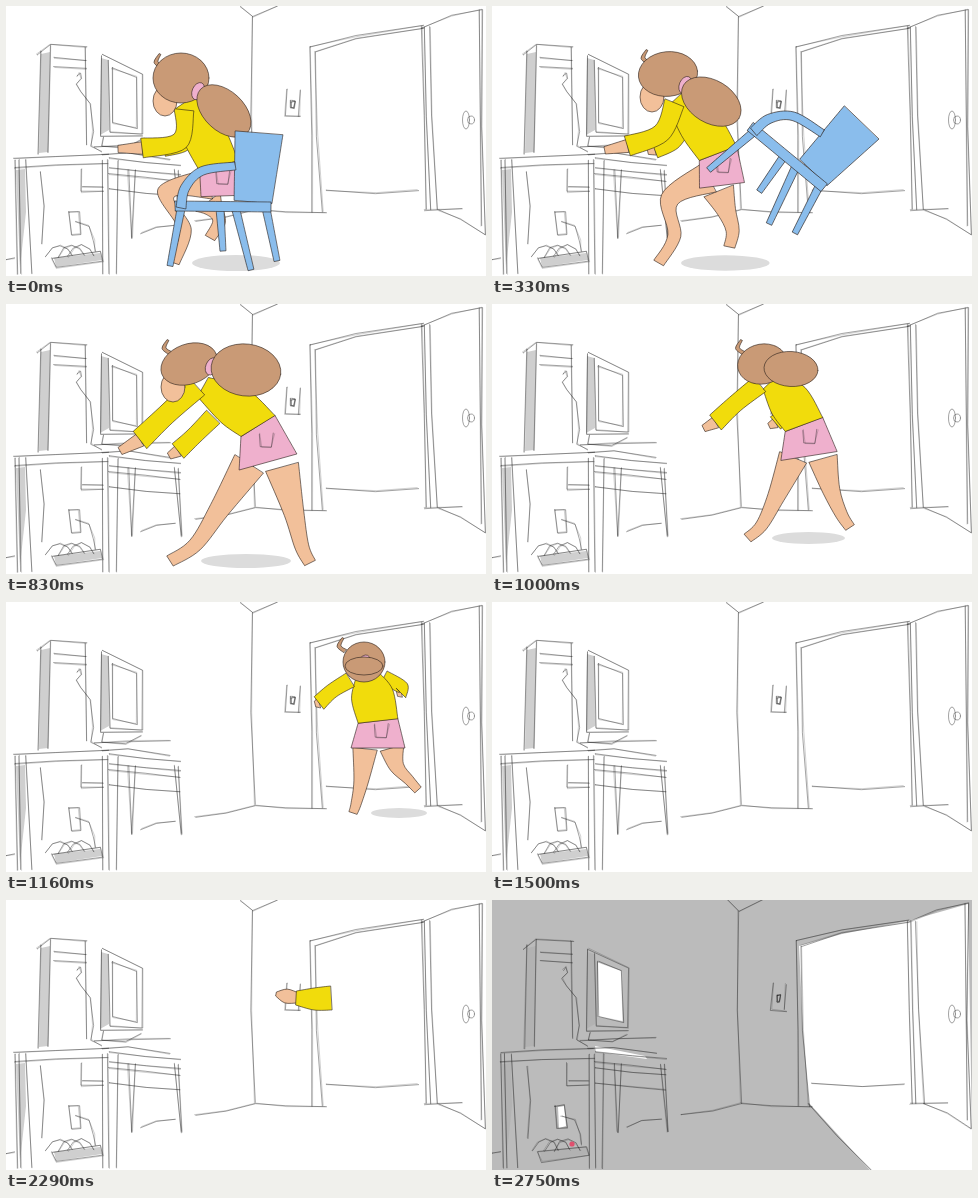
Write an HTML page with a canvas that moves like this. It is 480 by 270 pixels and loops after 3.25 s.

```html
<!DOCTYPE html>
<html lang="en">
<head>
<meta charset="utf-8">
<style>
html, body { margin: 0; width: 100%; height: 100%; overflow: hidden; background: #fff; }
canvas { display: block; }
</style>
</head>
<body>
<canvas id="stage" width="480" height="270"></canvas>
<script>
const ctx = document.getElementById('stage').getContext('2d');
const LOOP = 3250, TICK = LOOP / 78;
const SKIN = '#f2c09a', HAIR = '#c99a76', YELLOW = '#f1dc0c', PINK = '#efb0cd', BLUE = '#8abdec';

const clamp = (v, a, b) => Math.min(b, Math.max(a, v));
const mix = (a, b, u) => Array.isArray(a) ? a.map((v, i) => mix(v, b[i], u)) : a + (b - a) * u;
const blend = (a, b, u) => Object.fromEntries(Object.keys(a).map(k => [k, mix(a[k], b[k], u)]));

// Joints of the girl; ellipses are x, y, rx, ry, turn.
const sitting = {
  head: [175, 72, 28, 25, 0], tail: [218, 105, 32, 20, .75], facing: 1, girth: .9, hem: 19,
  spine: [[178, 97], [196, 125], [213, 160], [214, 190]],
  nearLeg: [[203, 178], [160, 187], [179, 224], [168, 257]],
  farLeg: [[202, 196], [208, 204], [213, 216], [204, 232]],
  nearArm: [[178, 104], [174, 135], [136, 142], [112, 143]],
  farArm: [[182, 125], [177, 138], [158, 142], [152, 142]],
  shadow: [230, 257, 44, 8, 0]
};
const braced = {
  head: [183, 60, 29, 20, -.35], tail: [240, 66, 35, 26, .12], facing: 1, girth: 1, hem: 30,
  spine: [[197, 83], [227, 101], [252, 122], [262, 158]],
  nearLeg: [[243, 160], [213, 206], [189, 241], [164, 257]],
  farLeg: [[276, 163], [288, 209], [296, 243], [304, 259]],
  nearArm: [[191, 83], [160, 111], [134, 136], [114, 147]],
  farArm: [[207, 113], [188, 132], [172, 147], [163, 152]],
  shadow: [240, 257, 45, 7, 0]
};
const leaning = { ...braced, head: [178, 60, 33, 17, -.3], tail: [222, 77, 33, 24, .12] };
const running = {
  head: [358, 60, 21, 20, 0], tail: [358, 64, 19, 9, 0], facing: 0, girth: .72, hem: 27,
  spine: [[361, 72], [366, 92], [372, 119], [372, 146]],
  nearLeg: [[359, 147], [355, 180], [350, 202], [347, 211]],
  farLeg: [[386, 146], [391, 165], [403, 178], [412, 188]],
  nearArm: [[344, 78], [326, 89], [313, 101], [309, 102]],
  farArm: [[378, 75], [397, 86], [395, 91], [391, 92]],
  shadow: [393, 211, 28, 5, 0]
};
const POSES = [sitting, leaning, braced, running];

// Chair bars: half widths at both ends, then the points they run through.
const CHAIR = [
  ...[[214, 203, 217, 245], [260, 202, 271, 255], [230, 204, 245, 264], [175, 203, 164, 260]]
    .map(([a, b, c, d]) => [4, 3, [[a, b], [c, d]]]),
  [24, 19, [[253, 127], [247, 196]]],
  [5, 5, [[169, 200], [265, 201]]],
  [4, 5, [[229, 160], [196, 165], [179, 182], [175, 202]]]
];

let seed = 1;
function wobble(size) {
  seed = seed * 16807 % 2147483647;
  return (seed / 2147483647 - .5) * size;
}

// Two loose pencil passes through x, y pairs.
function sketch(...xy) {
  ctx.strokeStyle = '#222';
  ctx.lineWidth = .7;
  for (const alpha of [.6, .3]) {
    ctx.globalAlpha = alpha;
    ctx.beginPath();
    for (let i = 0; i < xy.length; i += 2) ctx.lineTo(xy[i] + wobble(1.6), xy[i + 1] + wobble(1.6));
    ctx.stroke();
  }
  ctx.globalAlpha = 1;
}

function fill(color, ...xy) {
  ctx.fillStyle = color;
  ctx.beginPath();
  for (let i = 0; i < xy.length; i += 2) ctx.lineTo(xy[i], xy[i + 1]);
  ctx.fill();
}

function paint(path, color) {
  ctx.fillStyle = color;
  ctx.fill(path);
  ctx.strokeStyle = 'rgba(40, 30, 25, .75)';
  ctx.lineWidth = .8;
  ctx.stroke(path);
}

// Outline of a chain of joints with a half width at each; from..to picks a part of it.
function limb(joints, widths, from = 0, to = joints.length - 1) {
  const sides = [[], []];
  for (let i = from; i <= to; i++) {
    const a = joints[Math.max(0, i - 1)], b = joints[Math.min(joints.length - 1, i + 1)];
    const angle = Math.atan2(b[1] - a[1], b[0] - a[0]) + Math.PI / 2;
    sides.forEach((side, s) => {
      const w = widths[i] * (s ? -1 : 1);
      side.push([joints[i][0] + Math.cos(angle) * w, joints[i][1] + Math.sin(angle) * w]);
    });
  }
  const path = new Path2D();
  for (const side of [sides[0], sides[1].reverse()]) {
    const at = i => side[clamp(i, 0, side.length - 1)];
    path.lineTo(...side[0]);
    for (let i = 0; i < side.length - 1; i++) {
      const [a, b, c, d] = [-1, 0, 1, 2].map(n => at(i + n));
      path.bezierCurveTo(b[0] + (c[0] - a[0]) / 6, b[1] + (c[1] - a[1]) / 6,
        c[0] - (d[0] - b[0]) / 6, c[1] - (d[1] - b[1]) / 6, ...c);
    }
  }
  path.closePath();
  return path;
}

function oval(x, y, rx, ry, turn = 0) {
  const path = new Path2D();
  path.ellipse(x, y, rx, ry, turn, 0, 7);
  return path;
}

function drawRoom(dark) {
  const shade = dark ? '#b2b2b2' : '#cfcfcf';
  seed = 7;
  fill(dark ? '#bbb' : '#fff', 0, 0, 480, 0, 480, 270, 0, 270);
  fill(shade, 35, 48, 44, 46, 42, 146, 33, 147);
  fill(shade, 95, 52, 102, 54, 103, 124, 94, 129);
  fill(shade, 10, 164, 19, 163, 20, 206, 14, 262);
  fill(shade, 48, 252, 94, 247, 96, 254, 50, 261);
  if (dark) {
    fill('#fff', 307, 46, 350, 34, 416, 21, 476, 4, 480, 230, 480, 270, 378, 270, 317, 203, 311, 130);
    fill('#fff', 106, 62, 130, 71, 131, 122, 106, 117);
    fill('#fff', 103, 146, 153, 156, 155, 159, 104, 152);
    fill('#fff', 66, 207, 72, 206, 74, 226, 67, 228);
    sketch(317, 203, 345, 236, 379, 270);
  }
  // Walls, doorway and open door
  sketch(235, 0, 247, 11, 271, 0);
  sketch(246, 11, 245, 110, 249, 203);
  sketch(189, 215, 220, 211, 249, 203, 280, 206, 320, 207);
  for (const d of [0, 5]) {
    sketch(304 + d, 41 + d, 350, 30 + d / 2, 417, 20 + d / 2);
    sketch(304 + d, 41 + d, 306 + d, 130, d ? 317 : 306, 206);
  }
  sketch(320, 184, 370, 187, 412, 184);
  for (const d of [0, 3, 8]) sketch(416 + d, 21, 418 + d, 110, 420 + d * 1.5, 203);
  sketch(416, 22, 445, 10, 476, 3, 475, 120, 479, 229, 455, 213, 432, 204);
  sketch(473, 4, 475, 220);
  sketch(418, 204, 456, 203);
  sketch(281, 83, 279, 110, 294, 111);
  sketch(294, 84, 293, 110);
  for (const d of [0, 1]) sketch(285, 95 + d, 289, 95, 288, 102, 285 + d, 102, 285, 95);
  for (const x of [460, 465]) {
    ctx.globalAlpha = .6;
    ctx.stroke(oval(x, 114, 3.5, x > 460 ? 4 : 9));
  }
  // Computer
  sketch(31, 49, 44, 39, 81, 41);
  sketch(44, 39, 42, 146);
  sketch(35, 45, 32, 148);
  sketch(79, 41, 80, 138);
  for (const y of [52, 61]) sketch(48, y, 80, y + 2);
  sketch(71, 70, 74, 67, 75, 73, 70, 78, 75, 86, 84, 98, 87, 125, 85, 140, 95, 146);
  sketch(96, 49, 137, 68, 136, 128, 104, 126, 102, 54);
  sketch(95, 50, 94, 131, 136, 130);
  sketch(106, 62, 130, 71, 131, 122, 106, 117, 106, 62);
  sketch(98, 132, 96, 140, 120, 142, 135, 134);
  for (const d of [0, 8]) sketch(88 + d, 141 + d, 122, 139 + d, 164, 138 + d * 2);
  // Desk
  for (const y of [151, 160]) sketch(8, y + 2, 50, y - 1, 102, y - 2);
  for (const y of [152, 162, 168, 183]) sketch(103, y, 140, y + 4, 174, y + 7);
  for (const [x, lean] of [[9, 2], [13, 2], [20, 6], [97, 0], [102, 1], [112, -2]]) sketch(x, 154, x + lean, 268);
  for (const [x, lean] of [[122, 3], [129, -3], [172, 4], [168, 7]]) sketch(x, 164, x + lean, 232);
  // Sockets and cables underneath
  sketch(75, 163, 75, 186, 97, 185);
  sketch(77, 181, 97, 181);
  sketch(35, 166, 38, 200, 36, 238);
  sketch(63, 206, 73, 205, 75, 228, 65, 229, 63, 206);
  sketch(69, 216, 83, 220, 88, 234, 89, 245);
  sketch(46, 252, 94, 246, 97, 255, 50, 262, 46, 252);
  for (const x of [40, 52, 62]) sketch(x, 251, x + 6, 242, x + 14, 239, x + 22, 243, x + 26, 250);
  sketch(0, 253, 8, 252);
  sketch(135, 227, 150, 221, 169, 219);
  if (dark) {
    ctx.fillStyle = '#e0506e';
    ctx.fill(oval(80, 244, 2.6, 2.6));
  }
}

function behindWall() {
  ctx.beginPath();
  ctx.rect(306, 0, 174, 270);
  ctx.clip();
}

function drawArm(joints, girth) {
  const widths = [11, 10, 11, 6].map(w => w * girth);
  paint(limb(joints.slice(2), [7 * girth, 4 * girth]), SKIN);
  paint(limb(joints, widths, 0, 2), YELLOW);
}

function drawGirl({ head, tail, facing, girth, hem, spine, nearLeg, farLeg, nearArm, farArm, shadow }) {
  const legWidths = [17, 10, 7, 6].map(w => w * girth), spineWidths = [11, 21, 20, hem];
  const [x, y] = head, [px, py] = mix(spine[2], spine[3], .5);
  ctx.fillStyle = '#dcdcdc';
  ctx.fill(oval(...shadow));
  for (const leg of [farLeg, nearLeg]) paint(limb(leg, legWidths), SKIN);
  drawArm(farArm, girth * .85);
  paint(limb(spine, spineWidths, 2, 3), PINK);
  sketch(px - 4, py - 10, px - 2, py + 3, px + 8, py + 3, px + 11, py - 11);
  paint(limb(spine, spineWidths, 0, 2), YELLOW);
  drawArm(nearArm, girth);
  paint(oval(x - 16 * facing, y + 23 * facing, 12 * facing, 15 * facing), SKIN);
  paint(limb([[x - 19, y - 11], [x - 25, y - 16], [x - 21, y - 24]], [2, 2, 1]), HAIR);
  paint(oval(...head), HAIR);
  paint(oval(...mix([x, y], tail.slice(0, 2), .4), 6, 9, .4), PINK);
  paint(oval(...tail), HAIR);
}

function drawGirlAt(tick) {
  const phase = tick < 18 ? clamp((tick - 6) / 6, 0, 2) : 2 + clamp((tick - 20) / 8, 0, 1);
  const k = Math.min(2, Math.floor(phase));
  const exit = Math.max(0, (tick - 28) / 4), size = 1 - .1 * Math.min(1, exit);
  ctx.save();
  if (exit > .5) behindWall();
  ctx.translate(360 - 38 * exit ** 1.6, 212);
  ctx.scale(size, size);
  ctx.translate(-360, -212);
  drawGirl(blend(POSES[k], POSES[k + 1], phase - k));
  ctx.restore();
}

function drawChair(tick) {
  const p = Math.max(0, (tick - 6) / 6);
  if (p > 1.6) return;
  ctx.save();
  ctx.translate(220 + 243 * p, 195 - 9 * p - 50 * Math.sin(Math.PI * p));
  ctx.rotate(117 * p * Math.PI / 180);
  ctx.translate(-220, -195);
  for (const [start, end, joints] of CHAIR) {
    paint(limb(joints, joints.map((_, i) => mix(start, end, i / (joints.length - 1)))), BLUE);
  }
  ctx.restore();
}

function drawReach(tick) {
  const p = tick < 61 ? clamp((tick - 49) / 6, 0, 1) : 1 - (tick - 61) / 4;
  ctx.save();
  if (p < .3) behindWall();
  ctx.translate(320 - 35 * Math.max(0, 1 - 4 * p), 98);
  ctx.rotate(150 * (1 - p) * Math.PI / 180);
  paint(limb([[-28, 0], [-40, -2], [-50, -4]], [5, 7, 2]), SKIN);
  paint(limb([[5, 0], [-12, 1], [-30, 0]], [12, 11, 7]), YELLOW);
  ctx.restore();
}

function frame(now) {
  // Drawn on ones while she jumps up, on twos afterwards.
  const tick = Math.floor((now % LOOP + 7) / TICK);
  const held = tick < 18 ? tick : tick - (tick - (tick < 49 ? 18 : 49)) % 2;
  drawRoom(tick >= 61);
  if (tick < 36) {
    drawGirlAt(held);
    drawChair(held);
  }
  if (tick >= 49 && tick < 66) drawReach(held);
  requestAnimationFrame(frame);
}

ctx.lineJoin = ctx.lineCap = 'round';
requestAnimationFrame(frame);
</script>
</body>
</html>
```
